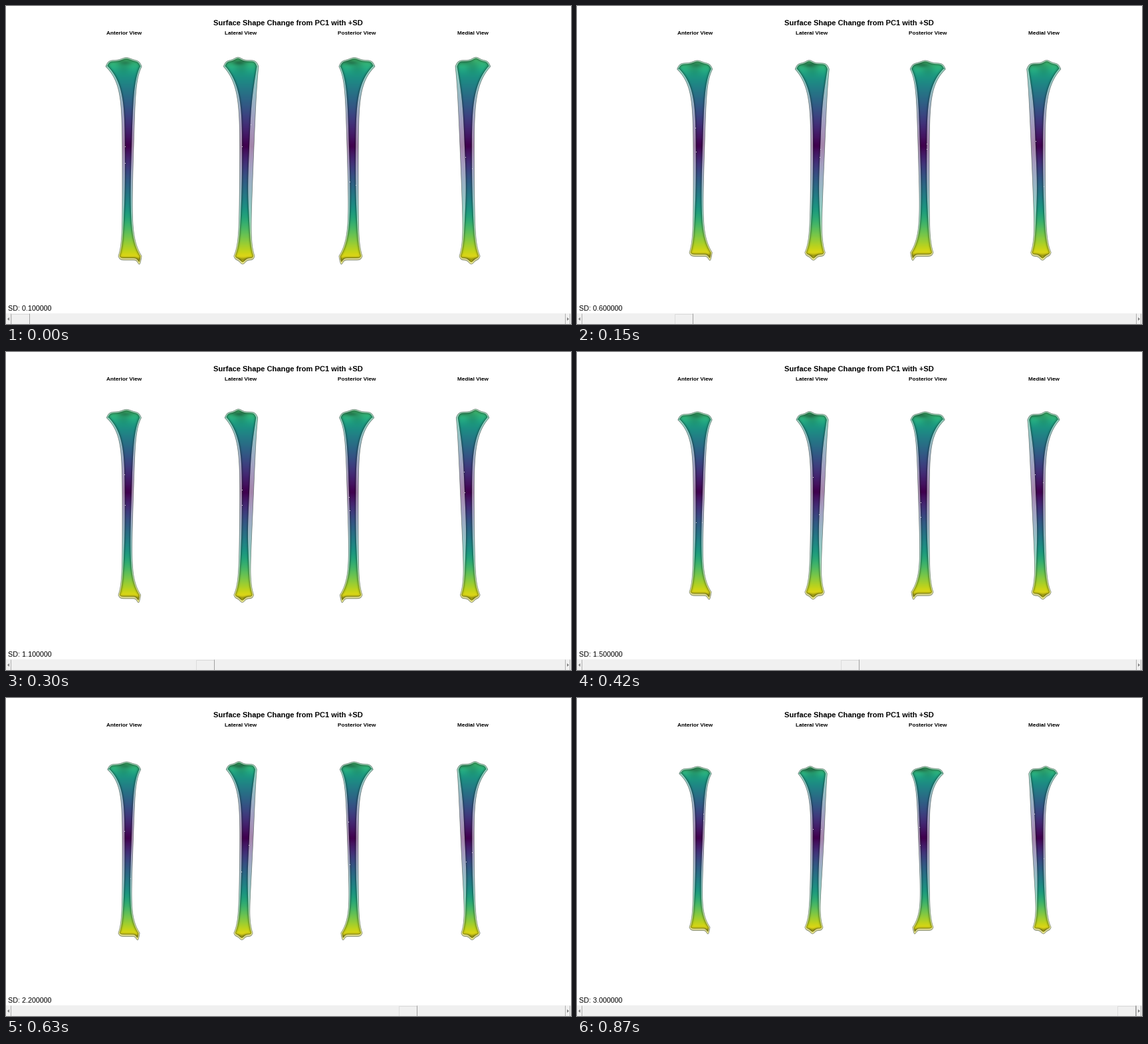
These frames come from a looping animation (850x478 px, 900 ms). A matplotlib script:

```python
import numpy as np
import matplotlib.pyplot as plt
from matplotlib.animation import FuncAnimation
from matplotlib.patches import Polygon, Rectangle

W, H, DPI = 850, 478, 100
FRAMES, INTERVAL = 30, 30
PX = 72 / DPI                      # points per pixel
MID, HEAD, ANKLE = 211, 91, 376    # heights of the fixed middle and both ends
TOP, BOTTOM = 70, 396              # rows covered by the colour map

# Edge: x at the middle, slope, then flare and its reach at head and ankle.
# Bump: x, width and height of the knob on a cap.
# Drift: how far the left and right side move in one loop.
FRONT = dict(left=(175, 0, -25, 24, -6, 18), right=(192, -.03, 8.5, 18, 17, 25),
             top=(181, 9, 4), bottom=(202, 4, 10),
             head_drift=(4, -2), ankle_drift=(0, -4), inset=(4, 3))
SIDE = dict(left=(352, -.01, -26, 28, -7.5, 18), right=(373, -.04, 2.2, 30, 7.6, 20),
            top=(349, 7, 4.5), bottom=(356, 5, 6),
            head_drift=(6, -4), ankle_drift=(0, -4), inset=(3.5, 7))

# label, label x, shape, mirror sum, x and depth of the dip in the plateau
VIEWS = [("Anterior View", 177.5, FRONT, None, 180, .2),
         ("Lateral View", 353.5, SIDE, None, 350, .3),
         ("Posterior View", 527.5, FRONT, 705, 518, .28),
         ("Medial View", 702.7, SIDE, 1056, 689, .15)]


def edge(y, shaft, slope, head, head_len, foot, foot_len):
    return (shaft + slope * (y - MID) + head * np.exp((HEAD - y) / head_len)
            + foot * np.exp((y - ANKLE) / foot_len))


def cap(x0, x1, y, height, bump, n=40):
    """Rounded end from x0 to x1 with one knob; a negative height points up."""
    c = np.cos(np.linspace(0, np.pi, n))
    x = (x0 + x1) / 2 + (x0 - x1) / 2 * c
    bx, width, rise = bump
    knob = np.sign(height) * rise * np.exp(-((x - bx) / width) ** 2)
    return np.column_stack([x, y + (1 - c**8) * (height + knob)])[:-1]


def silhouette(s):
    """Closed outline, clockwise from the left of the head."""
    y = np.linspace(HEAD, ANKLE, 70)
    left, right = edge(y, *s["left"]), edge(y, *s["right"])
    return np.vstack([cap(left[0], right[0], HEAD, -9.5, s["top"]),
                      np.column_stack([right, y])[:-1],
                      cap(right[-1], left[-1], ANKLE, 6, s["bottom"]),
                      np.column_stack([left, y])[:0:-1]])


def squash(y, k):
    return MID + (y - MID) * (1 - .19 * k)


def deform(p, s, k):
    x, y = p.T
    ends = [[edge(h, *s[side]) for side in ("left", "right")] for h in (HEAD, ANKLE)]
    head = np.interp(x, ends[0], s["head_drift"])
    ankle = np.interp(x, ends[1], s["ankle_drift"])
    down = np.clip((y - HEAD) / (ANKLE - HEAD), 0, 1)
    weight = .5 + .5 * np.minimum(1, np.abs(y - MID) / 130) ** 2
    drift = head + (ankle - head) * down
    return np.column_stack([x + k * weight * drift, squash(y, k)])


def shrink(p, y, inset, k):
    """Move outline p inwards, most of all along the shaft."""
    tx, ty = (np.roll(p, -1, 0) - np.roll(p, 1, 0)).T
    size = np.hypot(tx, ty) + 1e-9
    nx, ny = ty / size, -tx / size
    shaft = np.exp(-((y - MID) / 105) ** 4)
    peak = np.where(nx < 0, *inset) * (1 - .2 * k)
    dx = 1.6 + (peak - 1.6) * shaft
    dy = np.where(ny > 0, 3, 1.6)
    return p - np.column_stack([nx * dx, ny * dy])


def surface(span, dip, depth):
    """Colour by distance from the middle, with a dip and a darker ankle rim."""
    y, x = np.mgrid[TOP:BOTTOM, span[0]:span[1]] + .5
    d = y - MID
    level = np.where(d < 0, .72 * np.abs(d / 134) ** 1.15, d / 170)
    rgb = plt.cm.viridis(np.clip(level, 0, .97))[..., :3]
    u = (x - span[0]) / (span[1] - span[0])
    light = (.94 - depth * np.exp(-((x - dip) / 11) ** 2 - ((y - 85) / 4) ** 2)
             - .06 * np.cos(4 * np.pi * u) * np.exp(-((y - 92) / 9) ** 2)
             - .25 * np.exp(-((y - 381) / 3) ** 2))
    return np.clip(rgb * light[..., None], 0, 1)


def prepare(label, label_x, shape, mirror, dip, depth):
    points = silhouette(shape)
    x0, x1 = int(points[:, 0].min()) - 3, int(points[:, 0].max()) + 4
    span = (mirror - x1, mirror - x0) if mirror else (x0, x1)
    return points, shape, mirror, span, surface(span, dip, depth)


BONES = [prepare(*v) for v in VIEWS]

fig = plt.figure(figsize=(W / DPI, H / DPI), dpi=DPI, facecolor="white")
ax = fig.add_axes([0, 0, 1, 1])


def line(xs, ys, color):
    ax.plot(xs, ys, color=color, lw=PX, solid_capstyle="butt", zorder=6)


def stroke(points, width, color, alpha, clip=None):
    rim = ax.add_patch(Polygon(points, fill=False, ec=color, lw=width * PX,
                               alpha=alpha, joinstyle="round", zorder=4))
    if clip is not None:
        rim.set_clip_path(clip)


def paint(image, points, span, k, alpha):
    mask = ax.add_patch(Polygon(points, fc="none", ec="none"))
    pic = ax.imshow(image, extent=(*span, squash(BOTTOM, k), squash(TOP, k)),
                    aspect="auto", interpolation="bilinear", alpha=alpha, zorder=3)
    pic.set_clip_path(mask)
    return mask


def draw_bone(bone, k, rng):
    points, shape, mirror, span, image = bone
    outer = deform(points, shape, k)
    inner = shrink(outer, points[:, 1], shape["inset"], k)
    if mirror:
        for p in (outer, inner):
            p[:, 0] = mirror - p[:, 0]
    paint(image, outer, span, k, .48)
    mask = paint(image, inner, span, k, 1)
    for width, alpha in ((6, .08), (2.2, .3)):
        stroke(inner, width, "#06140f", alpha, mask)
    stroke(outer, .8, "#35453f", .6)
    # tiny gaps along the shaft edge
    shaft = inner[np.abs(inner[:, 1] - 222) < 50]
    for x, y in shaft[rng.integers(0, len(shaft), 2)]:
        ax.add_patch(Rectangle((round(x), round(y)), 1, 1, fc="#e4e4e8", zorder=5))


def write(x, y, s, px, weight="bold", ha="center"):
    ax.text(x, y, s, family="Liberation Sans", size=px * PX, weight=weight,
            ha=ha, va="baseline", color="black")


def draw_slider(k):
    ax.add_patch(Rectangle((0, 462), 849, 16, fc="#f0f0f0", zorder=5))
    for x in (7.5, 841.5, 848.5):
        line([x, x], [462, 478], "#b0b0b0")
    for tip, back in ((2, 5), (847, 844)):
        ax.add_patch(Polygon([(tip, 470.5), (back, 468), (back, 473)],
                             fc="#808080", zorder=6))
    x = round(8 + 805 * k)
    ax.add_patch(Rectangle((x, 462), 27, 16, fc="#f0f0f0", zorder=6))
    line([x + .5, x + .5, x + 27], [478, 462.5, 462.5], "#dcdcdc")
    line([x, x + 27.5, x + 27.5], [477.5, 477.5, 462], "#a0a0a0")


def draw(i):
    ax.clear()
    k = i / (FRAMES - 1)
    rng = np.random.default_rng(i + 5)
    for bone, (label, label_x, *_) in zip(BONES, VIEWS):
        draw_bone(bone, k, rng)
        write(label_x, 43.4, label, 8.25)
    write(424.5, 29, "Surface Shape Change from PC1 with +SD", 11.07)
    write(3.5, 458.4, f"SD: {(i + 1) / 10:f}", 10.75, "normal", "left")
    draw_slider(k)
    ax.set(xlim=(0, W), ylim=(H, 0))
    ax.axis("off")
    return []


anim = FuncAnimation(fig, draw, frames=FRAMES, interval=INTERVAL,
                     repeat=True, repeat_delay=0, blit=False)
plt.show()
```
